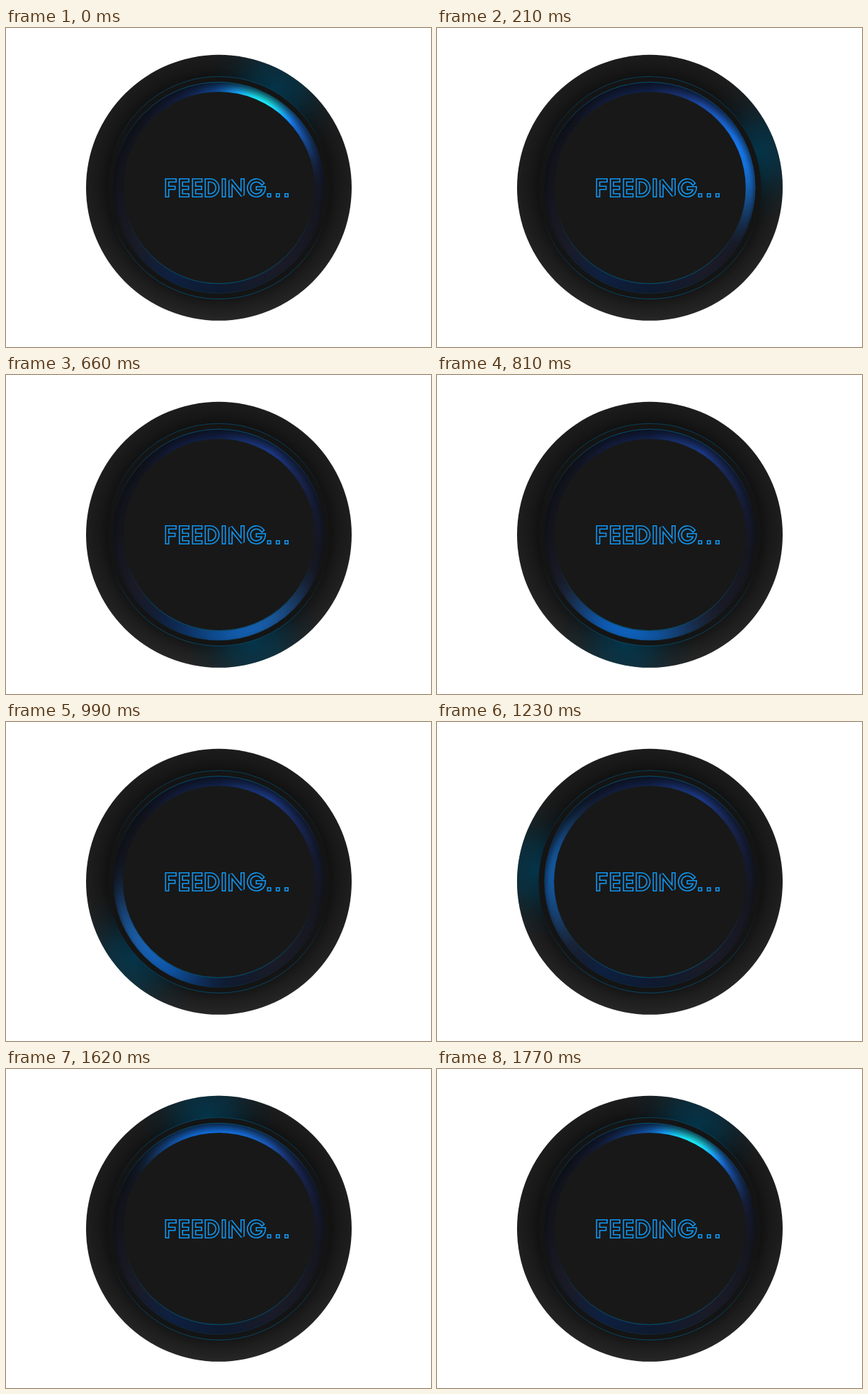
An HTML page with a canvas that plays this animation: 600 by 450 pixels, repeating every 1.8 s.

```html
<!DOCTYPE html>
<html lang="en">
<head>
<meta charset="utf-8">
<title>Feeding</title>
<style>
  html, body { margin: 0; width: 100%; height: 100%; overflow: hidden; background: #fff; }
  canvas { display: block; width: 600px; height: 450px; }
</style>
</head>
<body>
<canvas id="stage" width="600" height="450" role="img" aria-label="FEEDING..."></canvas>
<script>
const ctx = document.getElementById('stage').getContext('2d');
const LOOP = 1800, STEP = 30;
const CX = 300.5, CY = 225.3;
const R_DISC = 187.5, R_GROOVE = 157, R_RING = 149, R_FACE = 135.3;
const rad = deg => deg * Math.PI / 180;

// Resting ring colours: [degrees clockwise from the top, colour]
const RING = [
  [0, '#101f48'], [15, '#17306e'], [32, '#1c3a8a'], [50, '#19285a'], [75, '#151a30'],
  [100, '#15161f'], [145, '#1a1b27'], [180, '#0e1a30'], [208, '#0e2040'],
  [235, '#1a1b27'], [270, '#13141c'], [310, '#12141d'], [335, '#121c3c'], [360, '#101f48']
];

const glyphE = x => `M${x + 9} 215H${x}V236H${x + 9}M${x} 225.5H${x + 8.5}`;
const dot = x => `M${x} 236h.01`;
const LETTERS = new Path2D([
  'M227.5 236V215H238M227.5 225.5H236.5',
  glyphE(247), glyphE(265.5),
  'M283.5 215H288A10.5 10.5 0 0 1 288 236H283.5Z',
  'M307.5 236V215',
  'M317 236V215L334 236V215',
  'M361.5 218.7A10.5 10.5 0 1 0 364 226H355.5',
  dot(371.5), dot(383.8), dot(396)
].join(''));

function circle(r, fill) {
  ctx.beginPath();
  ctx.arc(CX, CY, r, 0, 2 * Math.PI);
  ctx.fillStyle = fill;
  ctx.fill();
}

function shade(gradient, stops) {
  stops.forEach(([at, color]) => gradient.addColorStop(at, color));
  return gradient;
}

// Hairline that is visible at the top and bottom and fades at the sides
function rim(r, top, bottom) {
  ctx.beginPath();
  ctx.arc(CX, CY, r, 0, 2 * Math.PI);
  ctx.lineWidth = 1.2;
  ctx.strokeStyle = shade(ctx.createLinearGradient(0, CY - r, 0, CY + r), [
    [0, `rgba(6,74,104,${top})`], [0.38, 'rgba(6,74,104,0)'],
    [0.62, 'rgba(6,74,104,0)'], [1, `rgba(6,74,104,${bottom})`]
  ]);
  ctx.stroke();
}

// Soft arc of light around the ring
function arcLight(deg, spread, rgb, strength) {
  const g = ctx.createConicGradient(rad(deg - 270), CX, CY);
  for (let i = -8; i <= 8; i++) {
    const alpha = strength * Math.cos(i / 8 * Math.PI / 2) ** 2;
    g.addColorStop(0.5 + i / 8 * spread / 360, `rgba(${rgb},${alpha.toFixed(4)})`);
  }
  circle(R_RING, g);
}

function drawBody(deg) {
  circle(R_DISC, shade(ctx.createLinearGradient(0, CY - R_DISC, 0, CY + R_DISC),
    [[0, '#1c1c1c'], [0.5, '#1e1e1e'], [1, '#262626']]));
  circle(R_DISC, shade(ctx.createRadialGradient(CX, CY, R_GROOVE, CX, CY, R_DISC),
    [[0, 'rgba(0,0,0,.42)'], [0.4, 'rgba(0,0,0,.2)'], [1, 'rgba(0,0,0,0)']]));

  const x = CX + 160 * Math.sin(rad(deg)), y = CY - 160 * Math.cos(rad(deg));
  circle(R_DISC, shade(ctx.createRadialGradient(x, y, 0, x, y, 98),
    [[0, 'rgba(0,60,86,.8)'], [0.35, 'rgba(0,56,80,.58)'],
     [0.7, 'rgba(0,46,66,.2)'], [1, 'rgba(0,40,60,0)']]));

  circle(R_GROOVE, '#141414');
  rim(R_GROOVE, 0.65, 0.85);
}

function drawRing(deg) {
  circle(R_RING, shade(ctx.createConicGradient(-Math.PI / 2, CX, CY),
    RING.map(([at, color]) => [at / 360, color])));

  ctx.globalCompositeOperation = 'lighter';
  const boost = 1 + 0.4 * Math.max(0, Math.cos(rad(deg - 50)));
  arcLight(deg, 58, '0,98,190', 0.68 * boost);
  const gap = Math.abs((deg - 27 + 540) % 360 - 180);
  const flare = Math.max(0, 1 - gap / 36);
  if (flare) arcLight(25, 30, '0,110,40', flare);
  ctx.globalCompositeOperation = 'source-over';

  circle(R_RING, shade(ctx.createRadialGradient(CX, CY + 6, 137, CX, CY + 6, 155),
    [[0, 'rgba(10,12,18,0)'], [0.3, 'rgba(10,12,18,.06)'], [1, 'rgba(10,12,18,.78)']]));
  rim(R_RING, 0.9, 0.25);
  circle(R_FACE, '#181818');
  rim(R_FACE, 0.1, 0.9);
}

function drawLabel() {
  ctx.lineCap = 'square';
  ctx.lineJoin = 'miter';
  ctx.miterLimit = 2;
  for (const [width, color] of [[6, '#1096f0'], [2.8, '#181818']]) {
    ctx.lineWidth = width;
    ctx.strokeStyle = color;
    ctx.stroke(LETTERS);
  }
}

function draw(time) {
  const deg = (30 + time / LOOP * 360) % 360;
  ctx.clearRect(0, 0, 600, 450);
  drawBody(deg);
  drawRing(deg);
  drawLabel();
}

const start = performance.now();
function tick() {
  const t = (performance.now() - start) % LOOP;
  draw(Math.floor(t / STEP) * STEP);
  requestAnimationFrame(tick);
}
tick();
</script>
</body>
</html>
```
